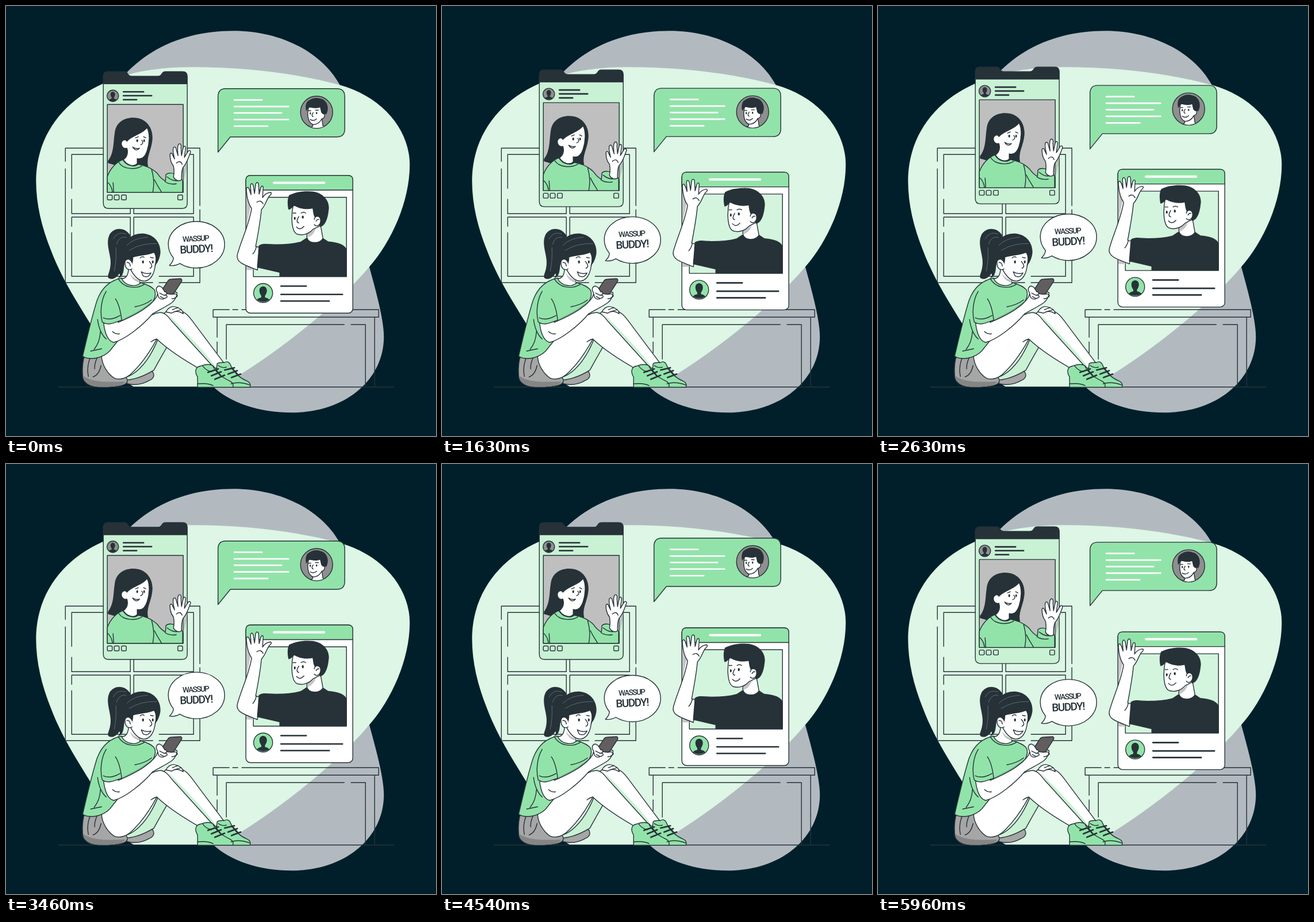
Animation, 748 px wide and 748 px high, one loop 6000 ms. Source, as an HTML page:

```html
<!DOCTYPE html>
<html lang="en">
<head>
<meta charset="utf-8">
<title>Friends chatting</title>
<style>
html, body { margin: 0; width: 100%; height: 100%; overflow: hidden; background: #001f2a; }
svg { display: block; width: 100vw; height: 100vh; }
.ink { stroke: #263238; stroke-width: 1.4; stroke-linecap: round; stroke-linejoin: round; fill: none; }
.thick { stroke-width: 2.6; }
.white { fill: #fff; }
.green { fill: #92e3a9; }
.pale { fill: #c9f1d4; }
.dark { fill: #263238; }
.gray { fill: #a6a6a6; }
.light { fill: none; stroke: #fff; stroke-width: 2.7; stroke-linecap: round; }
.shine { fill: none; stroke: #65717a; stroke-width: .9; stroke-linecap: round; }
text { font-family: Roboto, "Open Sans", sans-serif; font-weight: 500; text-anchor: middle; letter-spacing: -1.5px; fill: #263238; }
</style>
</head>
<body>
<svg viewBox="0 0 748 748">
  <defs>
    <clipPath id="chatFace"><circle cx="540" cy="184.500" r="27.500"/></clipPath>
    <g id="bust">
      <path d="M-6,-3C-6,-12 6,-12 6,-3C6,1 4,4 3,5V8C7,9 9,10 10,12Q0,18 -10,12C-9,10 -7,9 -3,8V5C-4,4 -6,1 -6,-3Z"/>
    </g>
  </defs>

  <g transform="translate(.3 .3)">
  <!-- Backdrop -->
  <path fill="#b2bac0" d="M200,126C250,68 320,43 395,43C480,43 553,82 583,142L631,451C643,495 657,545 657,575C657,650 590,707 497,707C440,707 390,690 360,662L320,400Z"/>
  <path fill="#ddf6e5" d="M52,304C52,225 100,165 168,135C215,113 270,106 322,106C420,106 510,118 580,137C655,158 702,215 702,276C702,340 670,410 632,453C592,501 522,563 442,618C418,634 396,648 375,662H222C190,645 170,590 148,555C120,510 95,470 78,425C62,385 52,345 52,304Z"/>
  <path class="ink" d="M91,662.500H674"/>

  <!-- Window and table -->
  <path class="ink" d="M103,270V247H337V347M103,283V481H255M337,354V481H266M114,317V258H216V361H114V336M114,383V367H216V470H114V394M222,258H326V361H222ZM222,470V367H326V470H266"/>
  <path class="ink" d="M388,528H360V541H648V528H410M394,528H403M367,541V576M367,584V603M367,610V622M641,541V662M383,614V554H588M600,554H625V662"/>

  <!-- Phone call -->
  <g id="phone">
    <path class="ink pale" d="M169,130H315V343Q315,352 306,352H178Q169,352 169,343Z"/>
    <path class="ink dark" d="M177,114H205Q209,114 211,117L213,120Q215,122 218,122H264Q268,122 270,119L272,116Q274,114 277,114H307Q315,114 315,122V135H169V122Q169,114 177,114Z"/>
    <circle class="ink" cx="185.500" cy="156" r="10" style="fill:#8f8f8f"/>
    <use href="#bust" class="dark" transform="translate(185.500 155.500) scale(.66)"/>
    <path class="ink thick" d="M204,149H239M204,155.700H253M204,162.700H227"/>
    <path class="ink" style="fill:#bfbfbf" d="M176,171H308V324H176Z"/>
    <path class="dark" d="M177,269C188,255 186,238 189,219C192,199 211,191 230,195C247,199 257,216 254,235C252,252 243,264 247,279L215,284L177,273Z"/>
    <path class="ink white" d="M210,235C218,225 238,222 245,211C251,222 249,240 245,252C241,264 235,267 228,265V274C222,280 210,277 204,267C211,262 212,254 210,247C203,249 199,242 201,236C203,232 208,231 210,235Z"/>
    <path class="ink green" d="M176,296C182,280 194,270 203,267C210,279 224,280 230,275C246,278 256,284 263,291C268,298 272,302 277,304L278,293C284,287 302,292 307,304V324H176Z"/>
    <path class="ink" d="M196,272C204,284 224,285 236,278M253,284C258,302 257,312 255,324M258,302C262,311 266,316 270,323M186,307L187,323M177,307Q183,312 185,323M276,305Q284,311 296,309M280,297Q292,307 304,302"/>
    <path class="gray" opacity=".55" d="M308,306V283L316,268Q314,287 308,306Z"/>
    <path class="ink white" d="M291,297C293,288 292,283 291,278C287,273 285,265 285,259C285,254 289,255 290,260L293,266C291,258 289,250 291,246C293,243 296,246 296,250L299,260C298,252 298,243 300,240C303,238 305,241 304,246L305,260L308,246C309,242 313,243 312,248L310,263L316,253C319,249 322,252 320,256C316,266 314,274 308,280C305,286 305,292 305,302C300,306 293,302 291,297Z"/>
    <path class="ink" d="M296,273Q303,267 306,275M236,233Q240,239 234,241M225,229L230,227M239,227L243,229"/>
    <path class="ink white" d="M220,245Q226,249 232,247Q226,254 220,245Z"/>
    <g class="dark"><ellipse cx="228" cy="234" rx="1.600" ry="2.500"/><ellipse cx="240" cy="234" rx="1.400" ry="2.500"/></g>
    <g class="ink">
      <rect x="176" y="328.500" width="8.500" height="8.500" rx="2"/><rect x="188" y="328.500" width="8.500" height="8.500" rx="2"/>
      <rect x="200.500" y="328.500" width="8.500" height="8.500" rx="2"/><rect x="298.500" y="328.500" width="8.500" height="8.500" rx="2"/>
    </g>
  </g>

  <!-- Chat message -->
  <g id="chat">
    <path class="ink green" d="M382,143.500H575Q589,143.500 589,157.500V213.500Q589,227.500 575,227.500H390L368.500,254V157.500Q368.500,143.500 382,143.500Z"/>
    <path class="light" d="M397,163H445M397,174.500H491M397,185.700H479M397,197.200H491M397,208.700H455"/>
    <circle class="ink" cx="540" cy="184.500" r="28" style="fill:#8f8f8f"/>
    <g clip-path="url(#chatFace)">
      <path class="ink white" d="M534,201L533,209L525,213H557L551,208L549,194Z"/>
      <path class="ink white" d="M526,176C523,190 525,203 534,206C541,206 546,202 549,196C555,195 556,186 550,184L546,173Z"/>
      <path class="dark" d="M522,183C520,176 521,168 525,165C531,160 539,158 547,161C558,163 563,177 557,188L551,188L548,185L546,176C538,179 531,177 527,175Z"/>
    </g>
    <path class="ink" d="M534,185Q530,191 534,192M529,197Q535,201 540,196M526,182H530M538,181H543"/>
    <g class="dark"><ellipse cx="529" cy="186.500" rx="1.200" ry="2"/><ellipse cx="540" cy="186" rx="1.200" ry="2"/></g>
  </g>

  <!-- Post card -->
  <g id="post">
    <rect class="ink white" x="417" y="294.500" width="186" height="239.500" rx="8"/>
    <path class="ink green" d="M417,320V302.500Q417,294.500 425,294.500H595Q603,294.500 603,302.500V320Z"/>
    <path class="light" style="stroke-width:4" d="M466,307.200H553"/>
    <path class="ink" style="fill:#d3f4dd" d="M430,332.500H592V470.500H430Z"/>
    <path fill="#c4c4c4" d="M418,322L425,350L418,383ZM418,451L430,455V459H418Z"/>
    <path class="ink white" d="M427,352C422,345 419,335 418,322C417,314 421,313 423,319L426,328L425,312C426,307 429,308 430,313L432,326L434,310C435,305 439,306 439,311L440,327L443,316C444,312 447,312 447,316L446,333C449,328 453,325 459,324C463,324 461,328 458,330C453,336 452,345 444,354C442,376 438,397 434,418L442,420L437,459C411,449 400,445 402,433C408,409 422,382 427,352Z"/>
    <path class="ink" d="M436,341Q443,336 447,344M435,419Q433,427 429,431"/>
    <path class="ink dark" d="M440,417C446,412 456,415 468,415C488,415 504,413 513,410L522,404H551L560,410C574,411 588,414 592,424V470H476V463L437,454Z"/>
    <path class="ink white" d="M524,385L523,402C526,414 545,414 551,404L546,376Z"/>
    <path fill="#c4c4c4" d="M525,395Q533,392 539,385Q537,397 524,403Z"/>
    <path class="ink white" d="M499,347C495,370 497,391 505,396C514,400 526,397 534,388L546,382L535,343Z"/>
    <path class="dark" d="M491,354C489,345 489,336 492,329C500,325 510,322 524,322C550,321 564,338 561,355C559,374 553,383 546,384L537,368C534,362 534,357 533,352C520,355 508,351 501,347C498,350 495,354 491,354Z"/>
    <path class="ink white" d="M536,371C537,363 547,364 547,373C547,381 540,385 536,380"/>
    <path class="ink" d="M509,366Q503,376 509,377M505,384Q511,391 518,383M499,360H504M513,360Q517,357 521,360M539,374Q541,370 544,371"/>
    <g class="dark"><ellipse cx="502" cy="369" rx="1.600" ry="2.600"/><ellipse cx="516" cy="367" rx="1.700" ry="2.700"/></g>
    <circle class="ink green" cx="447" cy="499" r="16.500"/>
    <use href="#bust" class="dark" transform="translate(447 498) scale(1.080)"/>
    <path class="ink thick" d="M478,487H522M478,501.500H585M478,513H562"/>
  </g>

  <!-- Speech bubble -->
  <g id="speech">
    <path class="ink white" d="M291,438C286,432 282,424 282,414.500C282,392 304,374.500 331,374.500C358,374.500 380,392 380,414.500C380,437 358,455.500 331,455.500C320,455.500 310,452.500 302,447.500C297,450.500 290,452 284,451C288,447 291,443 291,438Z"/>
    <g transform="rotate(-3 330 415)">
      <text x="330" y="409" font-size="13.500">WASSUP</text>
      <text x="330" y="429" font-size="19">BUDDY!</text>
    </g>
  </g>

  <!-- Seated girl -->
  <g>
    <path class="ink gray" d="M200,650C222,648 240,642 254,635C259,641 257,648 249,651C237,658 226,660 212,657Z"/>
    <path class="ink pale" d="M188,647C218,652 247,625 267,572L278,540L300,560C280,590 267,615 257,633C238,645 215,653 196,650Z"/>
    <path class="ink white" d="M268,549C270,532 284,525 299,528C313,532 319,541 328,553L379,621L364,630C337,602 305,575 282,555Z"/>
    <path class="pale" d="M283,537C292,556 324,585 355,622L365,628C343,598 313,568 283,537Z"/>
    <path class="ink green" d="M367,622C370,619 376,620 380,620C384,617 389,619 391,626C399,641 409,648 419,652C424,654 426,659 424,663H388L365,638Z"/>
    <path class="ink gray" d="M137,606L180,596L211,650C212,659 198,663 166,663C145,663 133,655 133,643C132,630 133,617 137,606Z"/>
    <path fill="#858585" d="M134,643C150,655 178,654 207,653Q204,663 166,662C145,663 135,654 134,643Z"/>
    <path class="ink white" d="M166,610C177,591 203,576 224,560C242,545 252,534 267,533C276,532 283,541 289,549L357,624L342,634C315,619 284,600 262,579C254,594 239,618 222,635C211,647 199,651 188,647C176,639 167,624 166,610Z"/>
    <path class="ink" d="M262,579Q257,580 252,584M149,606Q139,624 143,644M165,625Q162,641 151,645M161,606Q153,620 154,631"/>
    <path class="ink green" d="M333,663V645C328,637 328,628 338,626C346,623 353,622 359,625C366,640 380,648 389,652C395,655 396,660 394,663Z"/>
    <path class="ink" d="M333,657Q350,655 360,660M342,626Q348,634 357,636M391,657Q405,652 424,659M369,625Q375,630 383,628"/>
    <path class="ink thick" d="M351,637L369,631M357,643L374,636M363,649L380,642M380,633L397,629M386,640L402,634M392,646L408,640M365,633L374,644M394,631L403,641"/>

    <path class="ink white" d="M278,532C281,525 289,520 297,524C304,526 308,531 308,535C299,529 293,530 288,534Z"/>
    <path class="ink" d="M289,528L299,524M294,531L304,528"/>
    <path class="ink green" d="M201,473C181,477 166,490 158,512C148,544 141,575 133,609C147,617 168,612 180,600L204,570L236,535C253,522 263,506 258,494C253,487 243,484 235,481C224,488 207,484 201,473Z"/>
    <path fill="#74b888" d="M198,547C217,537 238,528 255,512Q257,521 239,533L219,557L193,576Z"/>
    <path class="ink" d="M195,474C204,490 225,493 240,484M159,545Q162,568 174,579M164,566Q163,585 153,597M147,600L166,596M224,523Q241,520 253,511"/>
    <path class="ink white" d="M169,545C170,563 175,582 187,585C207,580 237,556 255,535C265,529 278,523 288,516C295,510 298,502 297,498L288,496L276,500L281,489C276,486 264,496 262,505C256,515 249,520 238,528C224,537 209,544 195,550L188,535Z"/>
    <path class="ink green" d="M174,496C165,510 163,534 167,549C176,557 190,550 201,546C199,530 195,516 190,509"/>
    <path class="ink" d="M169,542Q181,548 198,538M185,566Q190,571 197,570"/>
    <path class="ink" style="fill:#625d5f" d="M282,477Q284,475 287,475L303,474Q307,475 305,479L292,499Q290,502 286,501L271,499Q268,498 270,495Z"/>
    <path class="ink white" d="M263,498C259,493 262,486 267,487L271,489L276,497C280,496 281,502 275,503C281,502 282,507 276,508C271,511 267,509 265,506Z"/>
    <path class="ink" d="M267,499L275,503M268,505L274,508M289,501Q297,499 298,504Q294,509 288,509"/>

    <path class="dark" d="M216,399C207,384 188,384 180,397C171,415 185,435 181,454C180,463 175,469 178,473C184,477 192,473 197,465C199,468 197,472 193,474C207,471 203,456 207,444Z"/>
    <path class="ink white" d="M213,454C213,465 210,474 201,474C207,487 225,489 233,482L231,475Z"/>
    <path fill="#c4c4c4" d="M215,465Q224,476 232,476L232,481Q219,478 215,465Z"/>
    <path class="ink white" d="M213,431L217,459C223,470 231,479 242,478C252,476 257,465 259,453C262,442 262,432 258,421Z"/>
    <path class="dark" d="M207,444C200,421 207,400 230,396C254,392 271,411 268,432C266,442 262,449 258,452C261,443 261,435 257,429C244,434 230,434 221,437C221,445 219,451 216,456Z"/>
    <path class="ink white" d="M219,446C214,436 205,440 207,449C208,458 214,460 219,457"/>
    <path class="ink" d="M210,446Q215,445 216,452M249,444Q257,453 250,456M233,438Q237,434 240,437M251,437L256,438"/>
    <path class="ink white" d="M235,462Q243,467 252,464Q247,474 238,469Z"/>
    <g class="dark"><ellipse cx="238" cy="445" rx="1.700" ry="2.700"/><ellipse cx="255" cy="445" rx="1.500" ry="2.700"/></g>
    <path class="shine" d="M214,425Q233,412 262,413M210,416Q222,403 246,402M186,405Q193,391 208,396M192,414Q197,399 209,402M191,420Q192,444 188,461"/>
  </g>
  </g>
</svg>
<script>
const LOOP = 6000;
const RISE = 14.96;
const delays = { speech: 0, post: 500, phone: 1000, chat: 1500 };
const parts = Object.entries(delays).map(([id, delay]) => [document.getElementById(id), delay]);

// Linear float: up for half a period, then back down, after an initial wait.
function floatY(time, delay) {
  const phase = Math.max(0, time - delay) / LOOP;
  return -RISE * (1 - Math.abs(1 - 2 * phase));
}

function draw(time) {
  for (const [part, delay] of parts) {
    part.setAttribute("transform", `translate(0 ${floatY(time, delay).toFixed(3)})`);
  }
}

const start = performance.now();
function tick() {
  draw((performance.now() - start) % LOOP);
  requestAnimationFrame(tick);
}
draw(0);
requestAnimationFrame(tick);
</script>
</body>
</html>
```
